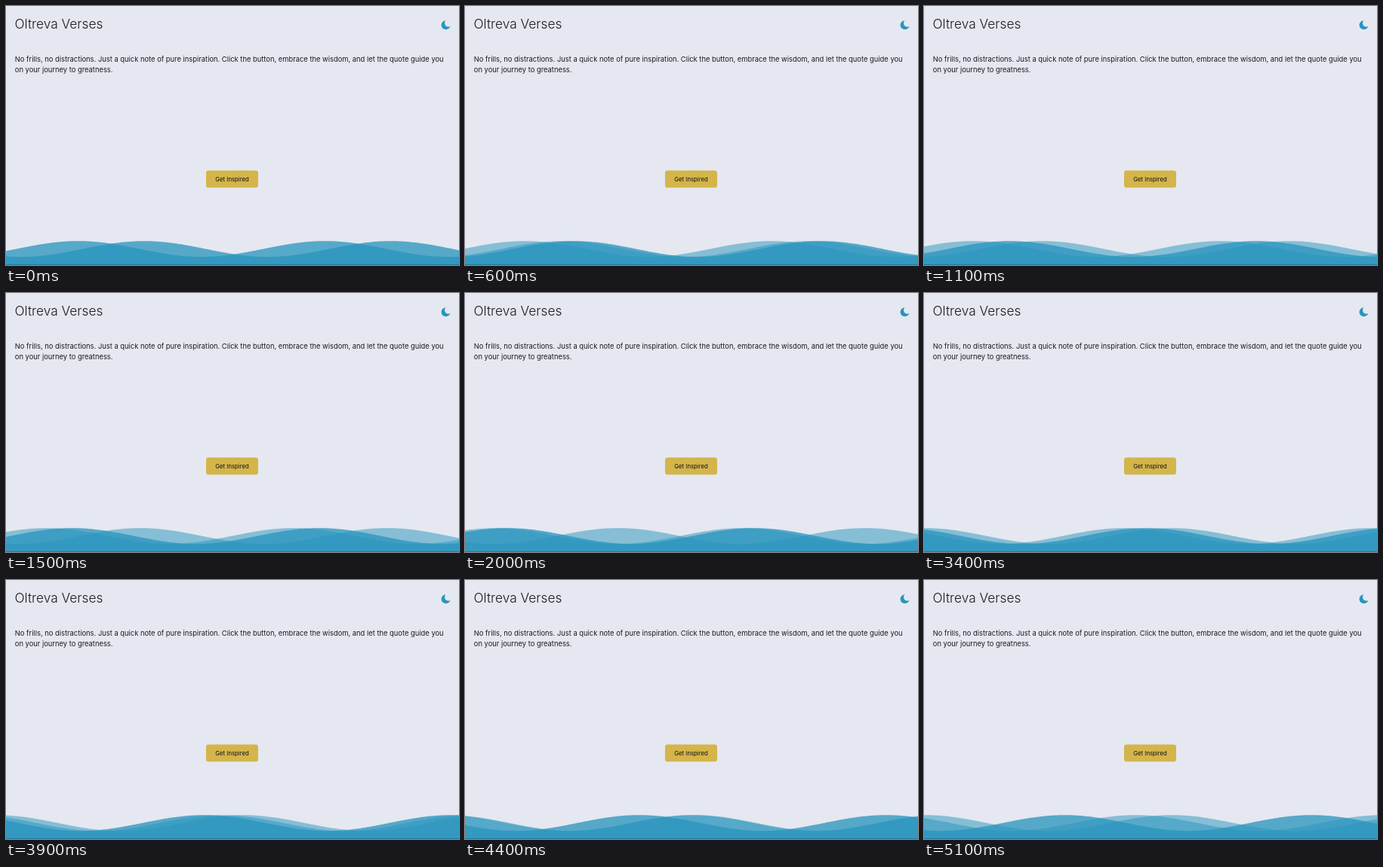
Write an HTML page with a canvas that moves like this. It is 600x344 px and loops after 5.2 s.

```html
<!DOCTYPE html>
<html lang="en">
<head>
<meta charset="utf-8">
<title>Oltreva Verses</title>
<style>
  html, body { margin: 0; width: 100%; height: 100%; overflow: hidden; background: #e5e8f0; }
  canvas { display: block; }
</style>
</head>
<body>
<canvas id="stage" width="600" height="344"></canvas>
<script>
const ctx = document.getElementById('stage').getContext('2d');
const WIDTH = 600, HEIGHT = 344;
const LOOP = 5200, STEP = 100;
const BACKDROP = '#e5e8f0', BLUE = '#2995be', GOLD = '#d4b54b', INK = '#1c1c20';
const FONT = 'Inter, "Open Sans", sans-serif';

const WAVE = { length: 327, middle: 322.7, height: 10.5 };
// crest: x of one crest at the start; speed: px per second; drag: slowing of the drift
const layers = [
  { crest: 96, speed: -28, drag: 0, alpha: 0.5 },
  { crest: 95, speed: 59, drag: 2.6, alpha: 0.5 },
  { crest: 183, speed: -63.5, drag: 0, alpha: 0.76 }
];

function write(text, x, y, size, weight, color, align = 'left') {
  ctx.font = `${weight} ${size}px ${FONT}`;
  ctx.textAlign = align;
  ctx.fillStyle = color;
  ctx.fillText(text, x, y);
}

function disc(x, y, radius, color) {
  ctx.fillStyle = color;
  ctx.beginPath();
  ctx.arc(x, y, radius, 0, Math.PI * 2);
  ctx.fill();
}

function drawPage() {
  ctx.fillStyle = BACKDROP;
  ctx.fillRect(0, 0, WIDTH, HEIGHT);

  write('Oltreva Verses', 11.5, 30, 17.3, 300, INK);
  write('No frills, no distractions. Just a quick note of pure inspiration. ' +
    'Click the button, embrace the wisdom, and let the quote guide you', 11.8, 73.6, 9.37, 400, INK);
  write('on your journey to greatness.', 11.8, 87.6, 9.37, 400, INK);

  disc(582.6, 25.2, 6, BLUE);
  disc(586, 22.8, 5, BACKDROP);

  ctx.fillStyle = GOLD;
  ctx.beginPath();
  ctx.roundRect(265, 218.5, 69, 22.8, 3.4);
  ctx.fill();
  write('Get Inspired', 299.5, 232.6, 7.75, 400, '#111', 'center');
}

function drawWave({ crest, speed, drag, alpha }, seconds) {
  const peak = crest + speed * seconds - drag * seconds ** 2;
  ctx.globalAlpha = alpha;
  ctx.fillStyle = BLUE;
  ctx.beginPath();
  ctx.moveTo(0, HEIGHT);
  for (let x = 0; x <= WIDTH; x += 2) {
    const phase = (x - peak) / WAVE.length * Math.PI * 2;
    ctx.lineTo(x, WAVE.middle - WAVE.height * Math.cos(phase));
  }
  ctx.lineTo(WIDTH, HEIGHT);
  ctx.fill();
  ctx.globalAlpha = 1;
}

function draw(ms) {
  const seconds = Math.floor(ms % LOOP / STEP) * STEP / 1000;
  drawPage();
  layers.forEach(layer => drawWave(layer, seconds));
  ctx.fillStyle = '#24799c';
  ctx.fillRect(0, HEIGHT - 1, WIDTH, 1);
}

const start = performance.now();
function tick() {
  draw(performance.now() - start);
  requestAnimationFrame(tick);
}
tick();
</script>
</body>
</html>
```
